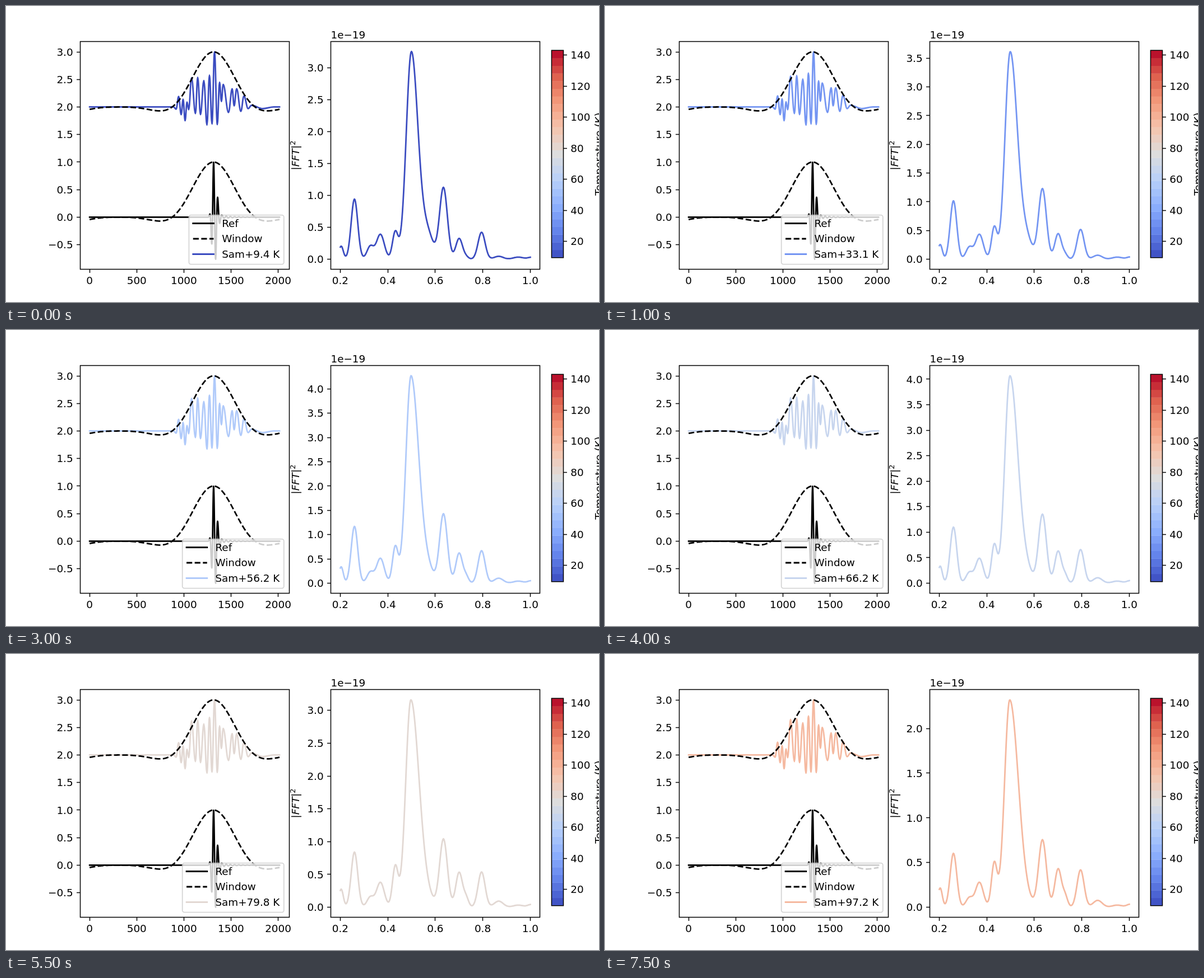
Recreate the animation shown at these times as an HTML page. Size 1058 by 529 pixels, loop 8 s.

```html
<!DOCTYPE html>
<html lang="en">
<head>
<meta charset="utf-8">
<title>Temperature sweep</title>
<style>
  html, body { margin: 0; width: 100%; height: 100%; overflow: hidden; background: #fff; }
  svg { display: block; width: 1058px; height: 529px; font: 18.37px "DejaVu Sans", sans-serif; }
</style>
</head>
<body>
<svg id="stage" viewBox="0 0 1058 529"></svg>
<script>
const STEP_MS = 500, STEPS = 16, LINE = 2.755, THIN = 1.47, TICK = 6.43, PAD = 12.86;
const LEFT = { l: 132.5, r: 505.5 }, RIGHT = { l: 579.5, r: 952.5 }, TOP = 63.5, BOTTOM = 470.5;
const BAR = { l: 973.4, r: 994.5, t: 79.35, b: 449.65 };
const X0 = 149.19, SPAN = 338.84, SAMPLES = 2015, CENTRE = 370.4;

// Step, temperature in K, height of the main spectral peak.
const sweep = [
  [0, 9.4, 3.25], [1, 23.1, 3.53], [2, 33.1, 3.61], [4, 45.8, 3.98], [5, 51.2, 4.37],
  [8, 66.2, 4.065], [10, 75.4, 3.32], [11, 79.8, 3.16], [13, 88.6, 2.9], [15, 97.2, 2.32]
];

// Side peaks: x, width, height relative to the main peak when cold and when warm.
const sidePeaks = [
  [598, 3.8, .063, .093], [621.7, 5.9, .29, .26], [650, 6, .062, .045], [668, 7, .12, .12],
  [694.5, 5, .13, .21], [752, 10, .12, .01], [780.5, 7, .345, .325], [808.5, 6, .1, .185],
  [821, 4.5, .01, .05], [848.5, 6.3, .13, .18], [879, 8, .014, .033], [914, 9, .01, .01], [937, 6, .009, .014]
];

// Turning points of the sample trace: x, height above its baseline.
const trace = [
  [X0, 0], [299, 0], [303.5, -.04], [308, .19], [312.5, -.14], [316, .14], [319.5, -.25],
  [323, .09], [326, -.05], [331, .53], [338, -.12], [342, .54], [347, -.14], [353, .48],
  [358.5, -.33], [363, .58], [367.5, -.31], [372, 1], [377, -.32], [381, .45], [384.3, .1],
  [387.5, .41], [397, -.1], [403.5, .33], [407, .02], [411.5, .33], [419, -.08], [424.5, .2],
  [432, -.03], [438, .03], [458, -.03], [478, 0], [X0 + SPAN, 0]
];
const coolwarm = "3b4cc0 6282ea 8db0fe b8d0f9 dddddd f5c4ad f49a7b de604d b40426"
  .split(" ").map(hex => hex.match(/../g).map(c => parseInt(c, 16)));

const mix = (a, b, t) => a + (b - a) * t;
const range = (n, f) => Array.from({ length: n }, (_, i) => f(i));
const each = (n, f) => range(n, f).join("");
const bell = d => Math.exp(-d * d / 2);
const snap = v => Math.floor(v) + .5;
const y1 = v => 82 + (3 - v) * 98.45;

function colour(kelvin) {
  const p = (kelvin - 9.4) / 133.5 * 8, i = Math.min(Math.floor(p), 7);
  return `rgb(${coolwarm[i].map((c, n) => Math.round(mix(c, coolwarm[i + 1][n], p - i)))})`;
}

function stateAt(step) {
  const n = Math.max(sweep.findIndex(k => k[0] >= step), 1), a = sweep[n - 1], b = sweep[n];
  const [, kelvin, peak] = a.map((v, j) => mix(v, b[j], (step - a[0]) / (b[0] - a[0])));
  return { kelvin, peak, warmth: (kelvin - 9.4) / 87.8, ink: colour(kelvin) };
}

const plot = (f, from, to, step) => "M" + range(Math.round((to - from) / step) + 1, i => {
  const x = from + i * step;
  return `${x.toFixed(2)},${f(x).toFixed(2)}`;
}).join("L");

// Curve that is flat at every turning point.
const wave = pts => pts.map(([x, y], i) => {
  if (!i) return `M${x},${y}`;
  const [px, py] = pts[i - 1], h = (x - px) * .38;
  return `C${[px + h, py, x - h, y, x, y].map(v => v.toFixed(2))}`;
}).join("");

const path = (d, stroke = "#000", style = "stroke-linecap:square") =>
  `<path d="${d}" fill="none" stroke="${stroke}" stroke-width="${LINE}" stroke-linejoin="round" style="${style}"/>`;
const dashed = d => path(d, "#000", "stroke-dasharray:10.19 4.41");
const thin = d => `<path d="${d}" fill="none" stroke="#000" stroke-width="${THIN}"/>`;
const text = (x, y, s, anchor = "start") => `<text x="${x}" y="${y}" text-anchor="${anchor}">${s}</text>`;
const upright = (x, y, s) => `<text transform="translate(${x} ${y}) rotate(-90)" text-anchor="middle">${s}</text>`;
const box = (l, t, r, b) => thin(`M${l},${t}H${r}V${b}H${l}Z`);
const xTick = (x, s) => thin(`M${snap(x)},${BOTTOM}v${TICK}`) + text(x, 497.4, s, "middle");
const yTick = (x, y, s) => thin(`M${x},${snap(y)}h${-TICK}`) + text(x - PAD, Math.round(y + 6.7), s, "end");

// Periodic flat-top window.
function flatTop(x) {
  const p = 2 * Math.PI * (x - CENTRE) / SPAN;
  return [.21558, .41663, .27726, .08358, .00695].reduce((s, c, k) => s + c * Math.cos(k * p), 0);
}

function pulse(x) {
  const d = x - CENTRE;
  const envelope = d < 0 ? Math.exp(-d * d / 17) : .95 * Math.exp(-d * d / 50) + .05 * Math.exp(-d / 20);
  return Math.cos(Math.PI * d / 3.75) * envelope;
}

function spectrum(x, { kelvin, peak, warmth }) {
  const d = x - (723.4 - kelvin / 75);
  const main = bell(d / (d < 0 ? 9.2 : mix(11.8, 15.4, warmth)));
  const sides = sidePeaks.reduce((s, [at, width, cold, warm]) =>
    s + mix(cold, warm, warmth) * bell((x - at) / width), 0);
  return peak * (main + sides);
}

function leftPlot({ ink, warmth }) {
  const windowAt = base => dashed(plot(x => y1(base + flatTop(x)), X0, X0 + SPAN, SPAN / 200));
  const points = trace.map(([x, v]) => [x, y1(2 + (v > 0 && v < 1 ? v * (1 + .22 * warmth) : v))]);
  return path(plot(x => y1(pulse(x)), X0, X0 + SPAN, SPAN / 800)) + windowAt(0) +
    path(wave(points), ink) + windowAt(2);
}

function rightPlot(state) {
  const scale = 370.5 / state.peak, y = v => 452.5 - v * scale;
  const ticks = Math.floor((452.5 - TOP) / scale * 2) + 1;
  return path(plot(x => y(spectrum(x, state)), 596.5, 935.5, 1), state.ink) +
    each(ticks, k => yTick(RIGHT.l, y(k / 2), (k / 2).toFixed(1)));
}

function legend({ kelvin, ink }) {
  const label = `Sam+${kelvin.toFixed(1)} K`, r = 495.8;
  const l = r - (kelvin < 10 ? 169.4 : 181.1), handle = y => `M${l + 7.35},${y}h36.74`;
  return `<rect x="${l}" y="373.6" width="${r - l}" height="88" rx="3.67" fill="#fff" stroke="#ccc" stroke-width="1.84" opacity=".8"/>` +
    path(handle(388.5)) + dashed(handle(416)) + path(handle(443.5), ink) +
    ["Ref", "Window", label].map((s, k) => text(l + 58.75, 395 + k * 27.4, s)).join("");
}

function axes() {
  const bands = 27, h = (BAR.b - BAR.t) / bands;
  return box(LEFT.l, TOP, LEFT.r, BOTTOM) + box(RIGHT.l, TOP, RIGHT.r, BOTTOM) +
    each(8, k => yTick(LEFT.l, y1(k / 2 - .5), (k / 2 - .5).toFixed(1).replace("-", "\u2212"))) +
    each(5, k => xTick(X0 + k * 500 * SPAN / SAMPLES, k * 500)) +
    each(5, k => xTick(596.44 + k * 84.7, (.2 + k * .2).toFixed(1))) +
    text(RIGHT.l, 58, "1e\u221219") +
    upright(523, 267.1, '|<tspan font-style="italic">FFT</tspan>|<tspan dy="-7" font-size="12.86">2</tspan>') +
    each(bands, k => `<rect x="${BAR.l}" y="${BAR.b - (k + 1) * h}" width="${BAR.r - BAR.l}" height="${h + .3}" fill="${colour(9.4 + (k + .5) / bands * 133.5)}"/>`) +
    box(BAR.l, BAR.t, BAR.r, BAR.b) +
    each(7, k => {
      const y = 420.5 - k * 55.5;
      return thin(`M${BAR.r},${snap(y)}h${TICK}`) + text(BAR.r + PAD, Math.round(y + 6.7), 20 + k * 20);
    }) +
    upright(1063.8, 264.5, "Temperature (K)");
}

const stage = document.getElementById("stage"), fixed = axes();
let shown = -1;
function draw() {
  const step = Math.floor(performance.now() / STEP_MS) % STEPS;
  if (step !== shown) {
    const state = stateAt(shown = step);
    stage.innerHTML = leftPlot(state) + rightPlot(state) + fixed + legend(state);
  }
  requestAnimationFrame(draw);
}
draw();
</script>
</body>
</html>
```
